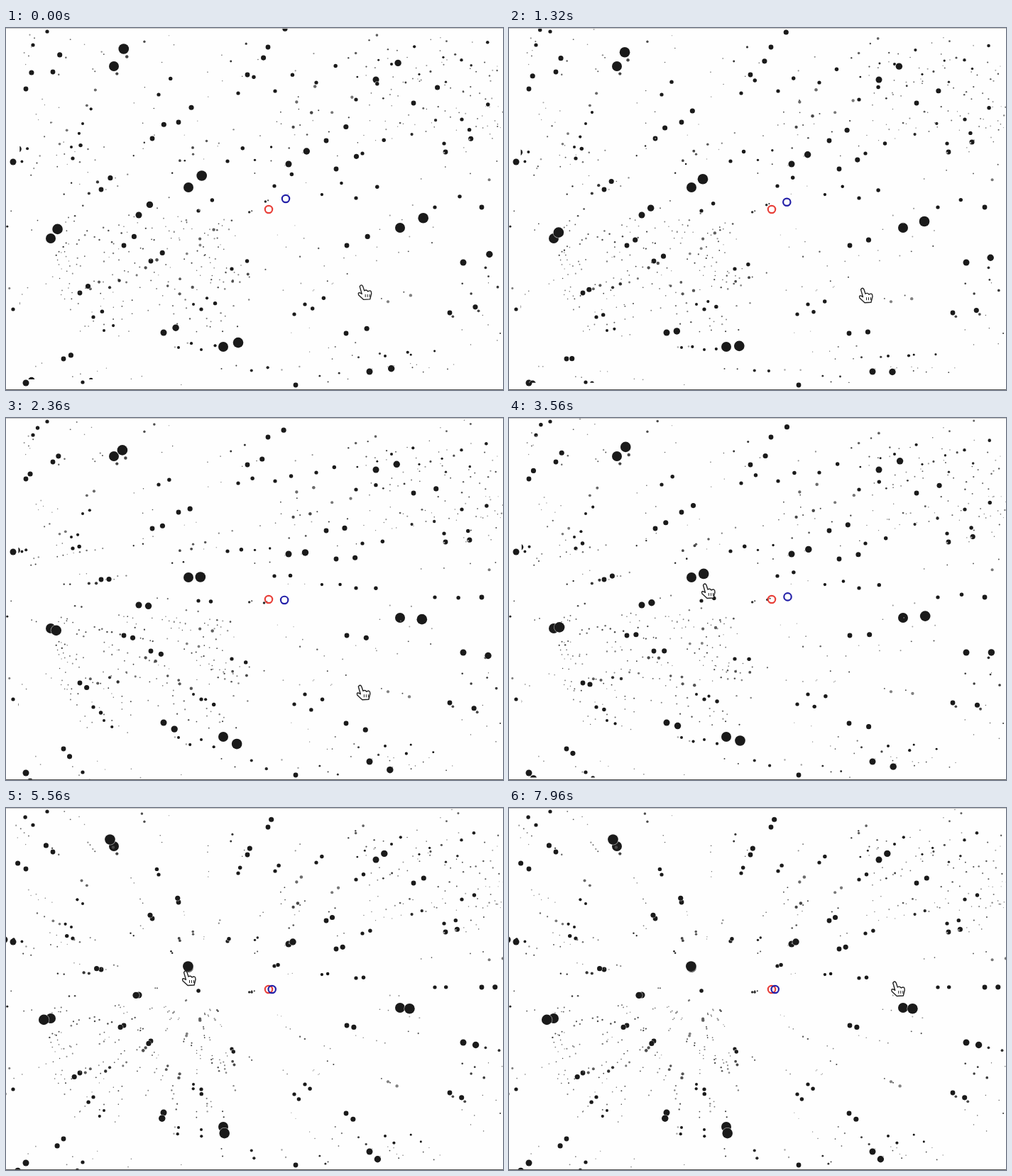
Write an HTML page with a canvas that moves like this. It is 700x511 px and loops after 8 s.

```html
<!DOCTYPE html>
<html>
<head>
<meta charset="utf-8">
<style>
html, body { margin: 0; width: 100%; height: 100%; overflow: hidden; background: #fefefe; }
canvas { display: block; }
</style>
</head>
<body>
<canvas id="sky" width="700" height="511"></canvas>
<script>
const ctx = document.getElementById('sky').getContext('2d');
const LOOP = 8000, CX = 370, CY = 256, ZOOM = 1.047;

// Main stars as x, y pairs, brightest first
const bright = [
  152,54, 257,225, 63,297, 306,450, 555,282,
  521,73, 644,331, 512,485, 10,189, 398,192, 222,430, 187,264, 28,501,
  340,66, 66,62, 243,133, 465,199, 479,431, 670,253, 619,175, 451,159,
  28,86, 104,374, 206,156, 574,106, 166,307, 480,307, 81,467, 134,228,
  625,402, 204,329, 369,27, 408,504,
  493,101, 271,258, 38,24, 327,92, 379,89, 437,77, 312,188, 10,397,
  502,177, 406,404, 421,390, 275,397, 378,223, 215,94, 94,184, 108,500,
  318,340, 493,240, 123,408, 58,5, 617,163, 642,129, 604,253,
  92,168, 108,135, 543,51, 534,463, 138,427, 243,451, 275,454, 264,390
];
const radius = i => i < 5 ? 7 : i < 13 ? 4.5 : i < 33 ? 3.4 : i < 56 ? 2.6 : 2;

const stars = [];
for (let i = 0; i < bright.length / 2; i++)
  stars.push({ x: bright[2 * i], y: bright[2 * i + 1], r: radius(i), ink: '#1a1a1a' });

// Faint stars, denser at the lower left and the upper right
let seed = 29;
const rnd = () => (seed = seed * 16807 % 2147483647) / 2147483647;
function scatter(count, r, dark, x, y, w, h) {
  while (count--) {
    const g = dark + rnd() * 110 | 0;
    stars.push({ x: x + w * rnd(), y: y + h * rnd(), r: r * (1 + rnd()), ink: `rgb(${g},${g},${g})` });
  }
}
scatter(55, 1.1, 20, 0, 5, 700, 500);
scatter(120, 0.6, 60, 0, 5, 700, 500);
scatter(75, 0.65, 50, 70, 270, 240, 160);
scatter(40, 0.6, 60, 500, 50, 195, 130);

// Tracks: time, x, y
const ringTrack = [[0, 394, 241], [540, 394, 280], [1260, 391.3, 245], [1900, 391.3, 274.5],
  [2520, 392.3, 253.5], [2720, 392.3, 253.5], [2920, 392.5, 252.4],
  [4600, 392.5, 252.4], [5500, 374.7, 256]];
const handTrack = [[3200, 503, 383], [3560, 280, 244], [3760, 267, 235], [4040, 274.5, 236.4],
  [4600, 274.5, 236.4], [5500, 257, 240], [7660, 257, 240], [7970, 548, 255]];

function at(track, t) {
  const i = track.findIndex(k => k[0] > t);
  if (i < 1) return (i ? track[track.length - 1] : track[0]).slice(1);
  const a = track[i - 1], b = track[i];
  const u = (t - a[0]) / (b[0] - a[0]), e = u * u * (3 - 2 * u);
  return [a[1] + (b[1] - a[1]) * e, a[2] + (b[2] - a[2]) * e];
}

function drawStars(halo) {
  for (const s of stars) {
    ctx.beginPath();
    ctx.arc(s.x, s.y, s.r, 0, 7);
    if (halo && s.r > 2.2) {
      ctx.strokeStyle = 'rgba(255,255,255,.6)';
      ctx.lineWidth = 1.4;
      ctx.stroke();
    }
    ctx.fillStyle = s.ink;
    ctx.fill();
  }
}

function ring(x, y, color) {
  ctx.beginPath();
  ctx.arc(x, y, 5.2, 0, 7);
  ctx.strokeStyle = color;
  ctx.lineWidth = 2.2;
  ctx.stroke();
}

const handShape = new Path2D('M-6.5-8Q-4-12-2-8L0-2Q3-4 5-1Q10-4 10 2L8 10L-1 10.5L-8 4Q-9.5 0-6 1L-3.5 2.5Z');

function drawHand(x, y) {
  ctx.save();
  ctx.translate(x, y);
  ctx.lineJoin = 'round';
  ctx.strokeStyle = '#222';
  ctx.fillStyle = '#fff';
  ctx.lineWidth = 1.4;
  ctx.fill(handShape);
  ctx.stroke(handShape);
  ctx.fillStyle = '#222';
  for (let k = 1; k < 8; k += 3) ctx.fillRect(k, 3, 1, 4);
  ctx.restore();
}

function draw(now) {
  const t = now % LOOP;
  const [bx, by] = at(ringTrack, t);
  ctx.fillStyle = '#fefefe';
  ctx.fillRect(0, 0, 700, 511);
  drawStars(false);

  // The enlarged copy, cropped to its own sheet
  ctx.save();
  ctx.beginPath();
  ctx.rect(bx - 374.7, by - 256, 700, 511);
  ctx.clip();
  ctx.translate(bx, by);
  ctx.scale(ZOOM, ZOOM);
  ctx.translate(-CX, -CY);
  drawStars(true);
  ctx.restore();

  ring(CX, CY, '#e8403a');
  ring(bx, by, '#2421a8');
  ctx.fillStyle = '#c4c4c4';
  ctx.fillRect(0, 0, 700, 1);
  ctx.fillStyle = '#555';
  ctx.fillRect(0, 510, 700, 1);

  if (t < 3200) drawHand(bx + 110.7, by * 0.9 + 156);
  else drawHand(...at(handTrack, t));
  requestAnimationFrame(draw);
}
requestAnimationFrame(draw);
</script>
</body>
</html>
```
